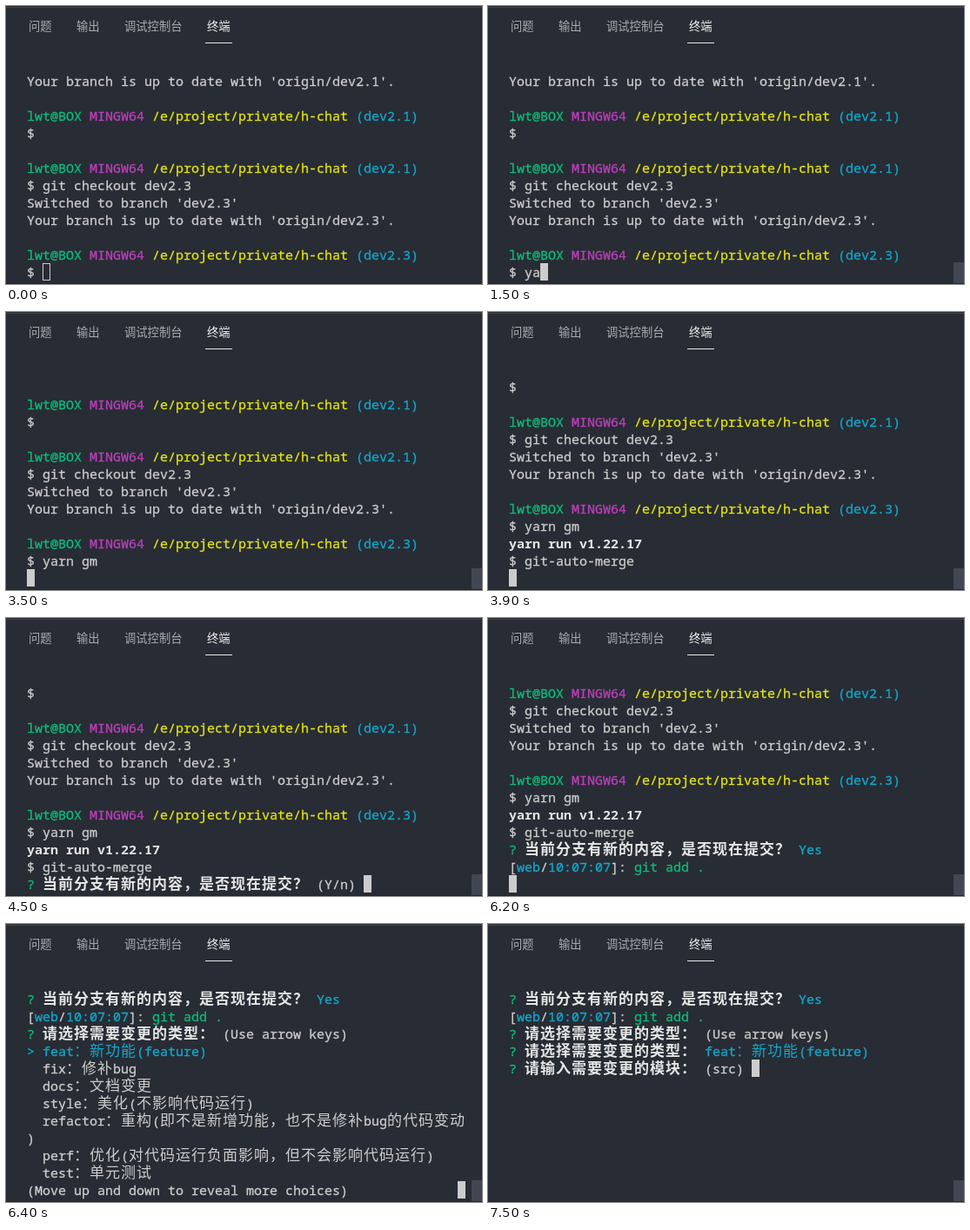
Animation, 547 px wide and 320 px high, one loop 8000 ms. Source, as an HTML page:

```html
<!DOCTYPE html>
<html lang="zh-CN">
<head>
<meta charset="utf-8">
<title>Terminal</title>
<style>
  html, body { margin: 0; width: 100%; height: 100%; overflow: hidden; background: #282c34; }
  #stage { position: relative; width: 547px; height: 320px; overflow: hidden; background: #282c34; }
  #stage > * { position: absolute; }
  .edge { left: 0; width: 547px; height: 1px; }
  .tab { top: 13px; font: 13.3px/20px "Noto Sans CJK SC", "Noto Sans CJK", sans-serif; color: #a9abaf; white-space: nowrap; }
  .active { color: #f0f0f0; }
  #underline { left: 229px; top: 42px; width: 31px; height: 1px; background: #e7e7e7; }
  #screen {
    left: 24px; top: 76px; color: #ccc; white-space: pre;
    font: 15px/20px "Noto Sans Mono", "Liberation Mono", monospace;
    font-variant-ligatures: none;
    -webkit-text-stroke: .3px;
  }
  #screen div { height: 20px; }
  #screen i {
    font: normal 300 17px/0 "Noto Sans CJK SC", "Noto Sans CJK", sans-serif;
    letter-spacing: 1px;
    -webkit-text-stroke: 0;
  }
  #screen b, #screen b i { font-weight: 700; color: #e5e5e5; -webkit-text-stroke: 0; }
  .green { color: #0dbc79; }
  .magenta { color: #bc3fbc; }
  .yellow { color: #e5e510; }
  .cyan { color: #11a8cd; }
  #cursor { width: 9px; height: 20px; box-sizing: border-box; border: 1px solid #ccc; }
  #cursor.solid { background: #ccc; }
  #thumb { left: 535px; top: 295px; width: 12px; height: 24px; background: #414753; }
</style>
</head>
<body>
<div id="stage">
  <div class="edge" style="top:1px;background:#3e4452"></div>
  <div class="tab" style="left:26px">问题</div>
  <div class="tab" style="left:81px">输出</div>
  <div class="tab" style="left:136px">调试控制台</div>
  <div class="tab active" style="left:231px">终端</div>
  <div id="underline"></div>
  <div id="screen"></div>
  <div id="cursor"></div>
  <div id="thumb"></div>
  <div class="edge" style="top:319px;background:#21252b"></div>
</div>
<script>
const LOOP = 8000, CELL = 9, ROW = 20;
const byId = id => document.getElementById(id);
const screenEl = byId('screen'), cursor = byId('cursor'), thumb = byId('thumb');

const paint = color => text => `<span class="${color}">${text}</span>`;
const [green, magenta, yellow, cyan] = ['green', 'magenta', 'yellow', 'cyan'].map(paint);
const bold = text => `<b>${text}</b>`;
const ask = (text, rest) => `${green('?')} ${bold(text)} ${rest}`;
const prompt = branch =>
  `${green('lwt@BOX')} ${magenta('MINGW64')} ${yellow('/e/project/private/h-chat')} ${cyan(`(${branch})`)}`;
const upToDate = branch => `Your branch is up to date with 'origin/${branch}'.`;

const history = [
  upToDate('dev2.1'), '',
  prompt('dev2.1'), '$', '',
  prompt('dev2.1'), '$ git checkout dev2.3', "Switched to branch 'dev2.3'", upToDate('dev2.3'), '',
  prompt('dev2.3')
];
const started = [...history, '$ yarn gm'];
const running = [...started, bold('yarn run v1.22.17'), '$ git-auto-merge'];
const commitAsk = '当前分支有新的内容，是否现在提交？';
const typeAsk = '请选择需要变更的类型：';
const added = [...running, ask(commitAsk, cyan('Yes')),
  `[${cyan('web')}/${cyan('10:07:07')}]: ${green('git add .')}`];
const choosing = [...added, ask(typeAsk, '(Use arrow keys)')];
const menu = [...choosing,
  cyan('&gt; feat：新功能(feature)'),
  '  fix：修补bug',
  '  docs：文档变更',
  '  style：美化(不影响代码运行)',
  '  refactor：重构(即不是新增功能，也不是修补bug的代码变动',
  ')',
  '  perf：优化(对代码运行负面影响，但不会影响代码运行)',
  '  test：单元测试',
  '(Move up and down to reveal more choices)'];
const moduleAsk = [...choosing,
  ask(typeAsk, cyan('feat：新功能(feature)')),
  ask('请输入需要变更的模块：', '(src)')];

const typed = (at, text) => ({ at, lines: [...history, '$ ' + text], top: 0, col: 2 + text.length });
const steps = [
  { ...typed(0, ''), hollow: true, bare: true },
  { ...typed(100, ''), hollow: true },
  typed(300, ''),
  typed(1500, 'ya'), typed(1600, 'yar'), typed(1700, 'yarn'),
  typed(1900, 'yarn '), typed(2000, 'yarn g'), typed(2100, 'yarn gm'),
  { at: 3500, lines: started, top: 1, col: 0 },
  { at: 3900, lines: running, top: 3, col: 0 },
  { at: 4500, lines: [...running, ask(commitAsk, '(Y/n)')], top: 3, col: 43 },
  { at: 6200, lines: added, top: 5, col: 0 },
  { at: 6300, lines: menu, top: 14, col: -9 },
  { at: 6400, lines: menu, top: 14, col: 55 },
  { at: 7500, lines: moduleAsk, top: 14, col: 31, row: 4 }
];

const wideRun = /[\u3000-\u9fff\uff00-\uffef]+/g;
const toRow = line => `<div>${line.replace(wideRun, '<i>$&</i>')}</div>`;

function show({ lines, top, col, row = 11, hollow, bare }) {
  screenEl.innerHTML = lines.slice(top).map(toRow).join('');
  cursor.style.left = 24 + col * CELL + 'px';
  cursor.style.top = 76 + row * ROW + 'px';
  cursor.className = hollow ? '' : 'solid';
  thumb.hidden = !!bare;
}

const start = performance.now();
let current;
function tick() {
  const time = (performance.now() - start) % LOOP;
  const step = steps.findLast(s => s.at <= time);
  if (step !== current) show(current = step);
  requestAnimationFrame(tick);
}
tick();
</script>
</body>
</html>
```
